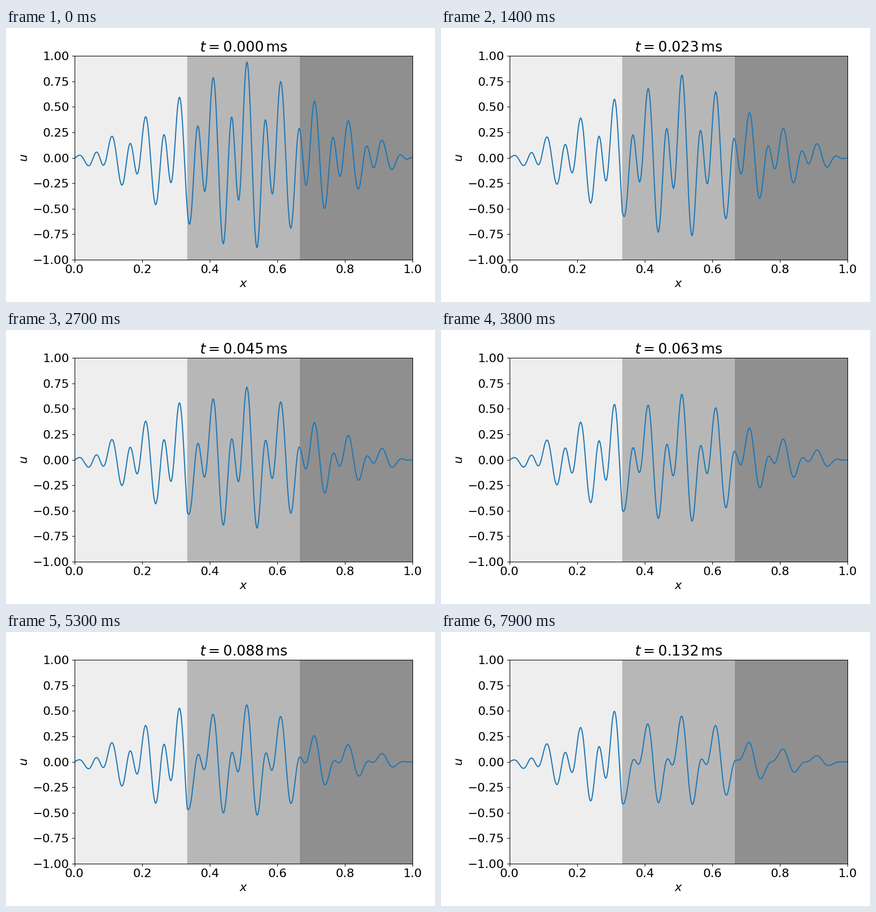
Recreate the animation shown at these times as a matplotlib script. Size 800 by 512 pixels, loop 8000 ms.

```python
import numpy as np
import matplotlib.pyplot as plt
from matplotlib.animation import FuncAnimation

FRAMES, INTERVAL = 80, 100
DT = 1 / 600                      # simulated ms per frame
CELLS = 600
LAYERS = [                        # left, right, diffusivity per ms, shade
    (0, 1 / 3, 1.24e-4, "#eeeeee"),
    (1 / 3, 2 / 3, 5.57e-4, "#b7b7b7"),
    (2 / 3, 1, 8.75e-4, "#8f8f8f"),
]

plt.rcParams.update({"font.family": "DejaVu Sans", "font.size": 16})


def initial(x):
    envelope = 1 - np.abs(2 * x - 1)
    p = 20 * np.pi * x
    return envelope * (0.42 * np.cos(p) + 2 / 3 * np.sin(2 * p)
                       + 0.045 * np.cos(3 * p))


def modes(cells):
    """Eigenpairs of the layered heat operator with fixed zero ends."""
    mid = (np.arange(cells) + 0.5) / cells
    k = np.select([mid < right for _, right, _, _ in LAYERS],
                  [d for _, _, d, _ in LAYERS]) * cells ** 2
    op = (np.diag(k[:-1] + k[1:])
          - np.diag(k[1:-1], 1) - np.diag(k[1:-1], -1))
    return np.linalg.eigh(op)


x = np.linspace(0, 1, CELLS + 1)
rates, basis = modes(CELLS)
weights = basis.T @ initial(x[1:-1])


def solve(t):
    u = np.zeros_like(x)
    u[1:-1] = basis @ (weights * np.exp(-rates * t))
    return u


def label(t):
    return rf"$t={t:.3f}\,\mathrm{{ms}}$"


fig, ax = plt.subplots(figsize=(8, 5.12), dpi=100)
for left, right, _, shade in LAYERS:
    ax.axvspan(left, right, facecolor=shade, linewidth=0)
line, = ax.plot(x, solve(0), color="#1f77b4", lw=1.5)
ax.set(xlim=(0, 1), ylim=(-1, 1), xlabel="$x$", ylabel="$u$")
title = ax.set_title(label(0))
fig.tight_layout()


def update(i):
    t = i * DT
    line.set_ydata(solve(t))
    title.set_text(label(t))
    return line, title


anim = FuncAnimation(fig, update, frames=FRAMES, interval=INTERVAL,
                     repeat=True, repeat_delay=0)
plt.show()
```
